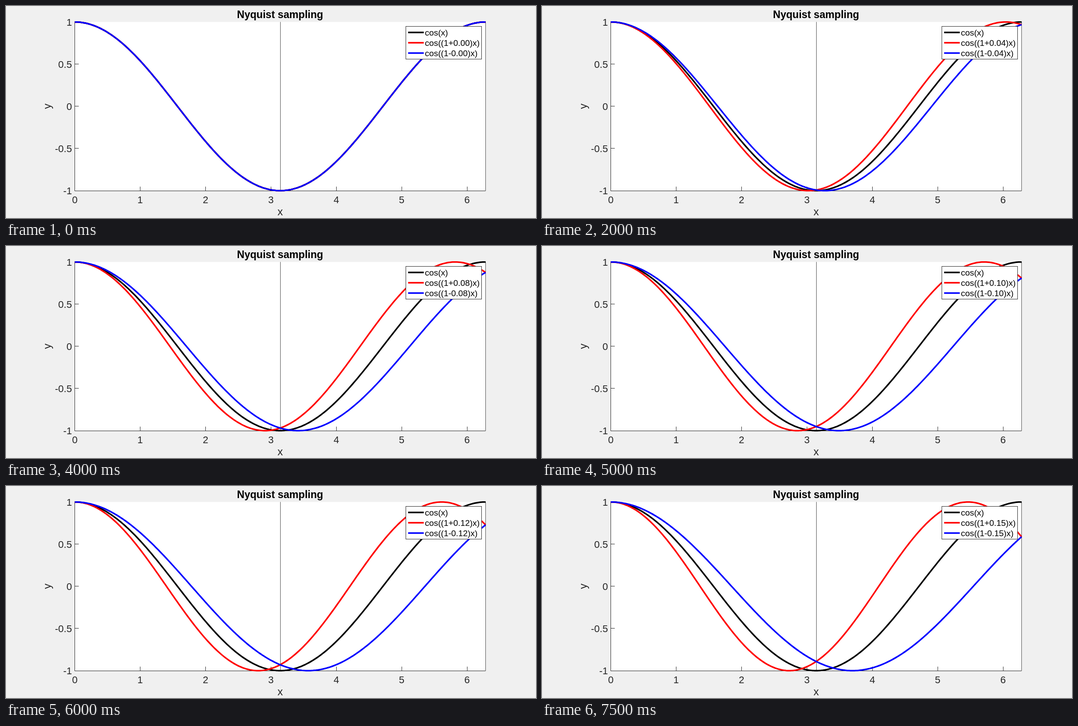
Animation, 1183 px wide and 473 px high, one loop 8000 ms. Source, as an HTML page:

```html
<!DOCTYPE html>
<html lang="en">
<head>
<meta charset="utf-8">
<title>Nyquist sampling</title>
<style>
  html, body { margin: 0; width: 100%; height: 100%; overflow: hidden; background: #f0f0f0; }
  svg { display: block; width: 100%; height: 100%; }
  text { font-family: "Liberation Sans", Arial, sans-serif; fill: #000; }
  .tick { font-size: 22px; fill: #262626; }
  .label { font-size: 24px; fill: #262626; }
  .title { font-size: 23.1px; font-weight: bold; }
  .legend { font-size: 18.9px; }
  .axis { fill: none; stroke: #262626; stroke-width: 1; }
  .marker { stroke: #4d4d4d; stroke-width: 1; }
  .curve { fill: none; stroke-width: 3.5; stroke-linejoin: round; }
</style>
</head>
<body>
<svg viewBox="0 0 1183 473"></svg>
<script>
const svg = document.querySelector('svg');
const LEFT = 153.5, RIGHT = 1070.5, TOP = 35.7, BOTTOM = 412;
const STEP_MS = 500, STEPS = 16, SAMPLES = 300;
const X_MAX = 2 * Math.PI;
const px = x => LEFT + x / X_MAX * (RIGHT - LEFT);
const py = y => (TOP + BOTTOM) / 2 - y * (BOTTOM - TOP) / 2;
const crisp = v => Math.floor(v) + 0.5;

function add(tag, attrs, content = '') {
  const node = document.createElementNS('http://www.w3.org/2000/svg', tag);
  for (const key in attrs) node.setAttribute(key, attrs[key]);
  node.textContent = content;
  return svg.appendChild(node);
}

function text(content, x, y, cls, anchor = 'middle', extra = {}) {
  return add('text', { x, y, class: cls, 'text-anchor': anchor, ...extra }, content);
}

function cosinePath(freq) {
  let d = '';
  for (let i = 0; i <= SAMPLES; i++) {
    const x = X_MAX * i / SAMPLES;
    d += `${i ? 'L' : 'M'}${px(x).toFixed(2)} ${py(Math.cos(freq * x)).toFixed(2)}`;
  }
  return d;
}

// Axes, ticks and labels
add('rect', { x: LEFT, y: 35.5, width: RIGHT - LEFT, height: 377, fill: '#fff' });
add('path', { class: 'axis', d: `M${LEFT} 35.5V412.5H${RIGHT}` });
for (let x = 0; x <= 6; x++) {
  add('path', { class: 'axis', d: `M${crisp(px(x))} 412v-9` });
  text(x, px(x), 440, 'tick');
}
for (let y = -1; y <= 1; y += 0.5) {
  add('path', { class: 'axis', d: `M${LEFT} ${crisp(py(y))}h9` });
  text(y, 147.2, py(y) + 8, 'tick', 'end');
}
for (const x of [Math.PI, X_MAX]) {
  add('path', { class: 'marker', d: `M${crisp(px(x))} 35.5V412` });
}
text('Nyquist sampling', 611.7, 27, 'title');
text('x', 612, 467, 'label');
text('y', 100.3, 223.7, 'label', 'middle', { transform: 'rotate(-90 100.3 223.7)' });

// Curves, with the legend above them
const series = [
  { color: '#000', sign: 0 },
  { color: '#f00', sign: 1 },
  { color: '#00f', sign: -1 }
];
for (const s of series) s.curve = add('path', { class: 'curve', stroke: s.color });

add('rect', { class: 'axis', x: 892.5, y: 45.5, width: 169, height: 73, style: 'fill:#fff' });
series.forEach((s, i) => {
  const y = 59 + 23 * i;
  add('path', { class: 'curve', stroke: s.color, d: `M897.5 ${y}h35` });
  s.label = text('', 935, y + 6.7, 'legend', 'start');
});

let shown = -1;
function draw(ms) {
  const step = Math.floor(ms / STEP_MS) % STEPS;
  if (step === shown) return;
  shown = step;
  const delta = step / 100;
  for (const { sign, curve, label } of series) {
    curve.setAttribute('d', cosinePath(1 + sign * delta));
    label.textContent = sign
      ? `cos((1${sign > 0 ? '+' : '-'}${delta.toFixed(2)})x)`
      : 'cos(x)';
  }
}

const start = performance.now();
function tick() {
  draw(performance.now() - start);
  requestAnimationFrame(tick);
}
tick();
</script>
</body>
</html>
```
